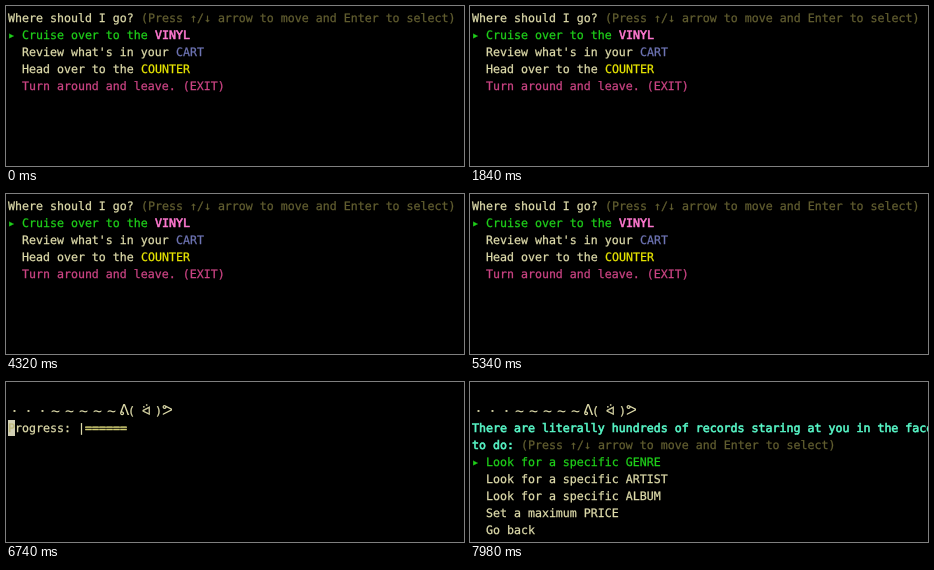
An HTML page that plays this animation: 458x160 px, repeating every 8000 ms.

```html
<!DOCTYPE html>
<html lang="en">
<head>
<meta charset="utf-8">
<style>
  html, body { margin: 0; width: 100%; height: 100%; overflow: hidden; background: #000; }
  svg { display: block; width: 458px; height: 160px; }
  text {
    font: 11.627px "DejaVu Sans Mono", "DejaVu Sans", monospace;
    white-space: pre;
    text-rendering: geometricPrecision;
    stroke: currentColor;
    fill: currentColor;
    stroke-width: .25px;
  }
  .strong { stroke-width: .6px; }
  .wide { font-size: 15px; stroke-width: 0; }
</style>
</head>
<body>
<svg id="stage" viewBox="0 0 458 160"></svg>
<script>
const LOOP = 8000, CLEARED = 6500, BAR_START = 6676, BAR_HOLD = 6840, ARRIVED = 7360;
const COL = 7, ROW = 17, LEFT = 2, BASE = 16;
const cream = '#dedbaa', dim = '#625e30', green = '#1fd01a', pink = '#ff78d0',
      slate = '#6e74b4', yellow = '#e8e600', rose = '#cc4484', aqua = '#58f8c8';
const stage = document.getElementById('stage');

function add(parent, tag, attributes, content = '') {
  const node = document.createElementNS('http://www.w3.org/2000/svg', tag);
  for (const key in attributes) node.setAttribute(key, attributes[key]);
  node.textContent = content;
  return parent.appendChild(node);
}

// Each part is [colour, text, class]; parts follow one another on the row.
function line(parent, row, ...parts) {
  let column = 0;
  for (const [color, content, className = ''] of parts) {
    add(parent, 'text',
      { x: LEFT + column * COL, y: BASE + row * ROW, color, class: className }, content);
    column += content.length;
  }
}

const hint = [dim, '(Press ↑/↓ arrow to move and Enter to select)'];

const menu = add(stage, 'g');
line(menu, 0, [cream, 'Where should I go? '], hint);
line(menu, 1, [green, '▸ Cruise over to the '], [pink, 'VINYL', 'strong']);
line(menu, 2, [cream, "  Review what's in your "], [slate, 'CART']);
line(menu, 3, [cream, '  Head over to the '], [yellow, 'COUNTER']);
line(menu, 4, [rose, '  Turn around and leave. (EXIT)']);

const walker = add(stage, 'g', { color: cream });
for (let i = 0; i < 8; i++) {
  const dot = i < 3;
  add(walker, 'text', { x: (dot ? 5 : 3) + i * 14, y: dot ? 33 : 34, class: dot ? '' : 'wide' },
    dot ? '·' : '~');
}
[['ᕕ', 113, 'wide'], ['(', 122], ['ᐛ', 136], [')', 149], ['ᕗ', 156, 'wide']]
  .forEach(([glyph, x, className = '']) =>
    add(walker, 'text', { x, y: 33, class: className }, glyph));

const progress = add(stage, 'g');
add(progress, 'rect', { x: 2, y: 38, width: 7, height: 16, fill: '#d2d0b4' });
line(progress, 2, ['#bdb878', 'P'], [cream, 'rogress: |']);
const bar = add(progress, 'text',
  { x: LEFT + 11 * COL, y: BASE + 2 * ROW, color: '#d2ce74', class: 'strong' });

const records = add(stage, 'g');
line(records, 2,
  [aqua, 'There are literally hundreds of records staring at you in the face.', 'strong']);
line(records, 3, [aqua, 'to do: ', 'strong'], hint);
line(records, 4, [green, '▸ Look for a specific GENRE']);
['Look for a specific ARTIST', 'Look for a specific ALBUM', 'Set a maximum PRICE', 'Go back']
  .forEach((label, i) => line(records, 5 + i, [cream, '  ' + label]));

function show(node, visible) {
  node.setAttribute('visibility', visible ? 'visible' : 'hidden');
}

function barLength(t) {
  if (t < BAR_START) return 0;
  if (t < BAR_HOLD) return Math.min(6, Math.floor((t - BAR_START) / 10.5));
  const steps = Math.floor((t - BAR_HOLD) / 40) + 1;
  return Math.min(68, 6 + Math.round(steps * 4.5));
}

function draw() {
  const t = performance.now() % LOOP;
  show(menu, t < CLEARED);
  show(walker, t >= CLEARED);
  show(progress, t >= CLEARED && t < ARRIVED);
  show(records, t >= ARRIVED);
  bar.textContent = '='.repeat(barLength(t));
  requestAnimationFrame(draw);
}
draw();
</script>
</body>
</html>
```
